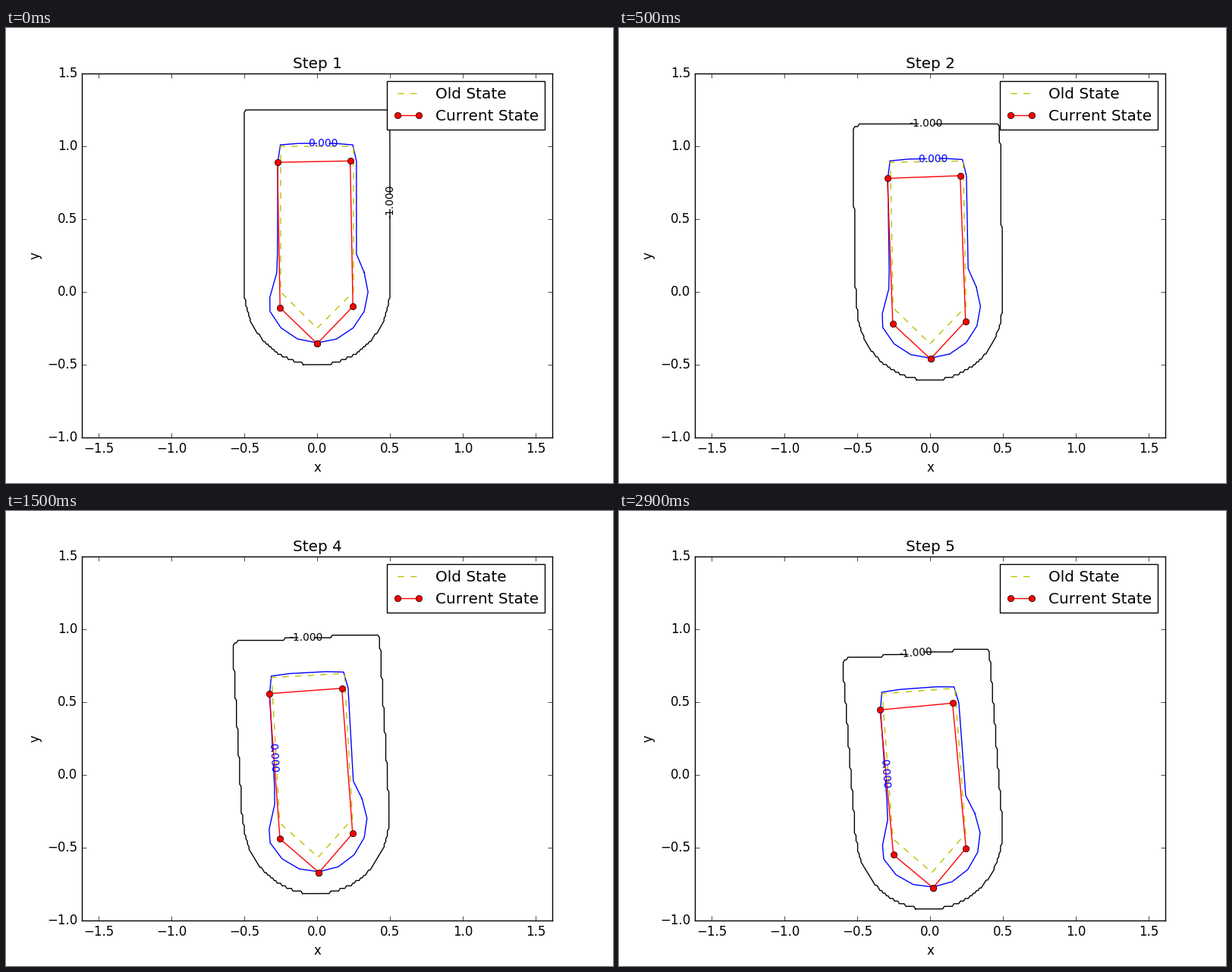
Animation, 800 px wide and 600 px high, one loop 3500 ms. Source, as a matplotlib script:

```python
import numpy as np
import matplotlib.pyplot as plt
from matplotlib.animation import FuncAnimation

plt.style.use("classic")
plt.rcParams["font.family"] = "DejaVu Sans"
plt.rcParams["text.kerning_factor"] = 6

SCALE = 192          # pixels per data unit
STEPS = 5
HOLD = 2             # extra ticks on the last step

# All shapes are in body coordinates: x to starboard, y towards the stern.
HULL = np.array([(0, -.25), (.25, 0), (.25, 1), (-.25, 1), (-.25, 0), (0, -.25)])

# Zero-level outline: a coarse arc round the bow, then up and over the stern.
arc = np.radians(np.arange(22.5, -158, -22.5))
bow = .35 * np.column_stack([np.cos(arc), np.sin(arc)])
stern = [(-.325, -.04), (-.277, .13), (-.272, .25), (-.27, .89), (-.252, 1.01),
         (-.13, 1.02), (.12, 1.02), (.245, 1.01), (.27, .9), (.27, .26)]
OUTLINE = np.vstack([bow, stern, bow[:1]])


def pose(n):
    """Position and heading of the body after n steps."""
    return np.array([-.0049 * n + .00088 * n * n, -.1052 * n]), .0185 * n


def place(points, n):
    origin, angle = pose(n)
    c, s = np.cos(angle), np.sin(angle)
    return np.asarray(points) @ np.array([(c, s), (-s, c)]) + origin


def safety_line(n):
    """Staircase edge of the safety zone, sampled on a grid over its bounds."""
    origin, angle = pose(n)
    left, right = place([(-.5, 1.25), (.5, 1.25)], n)
    xs = np.linspace(min(left[0], origin[0] - .5), origin[0] + .5, 100)
    ys = np.linspace(origin[1] - .5, right[1], 100)
    x, y = np.meshgrid(xs, ys)
    dx, dy = x - origin[0], y - origin[1]
    c, s = np.cos(angle), np.sin(angle)
    u, v = c * dx + s * dy, c * dy - s * dx
    box = (abs(u) < .5) & (v >= 0) & (v < 1.25)
    inside = box | ((v < 0) & (np.hypot(u, v) < .492))
    inside[[0, -1], :] = False
    inside[:, [0, -1]] = False
    contour = ax.contour(x, y, inside - 1.0, levels=[-.99])
    line = max(contour.allsegs[0], key=len)
    contour.remove()
    return line


def draw_level(line, label, curve, anchor, width, gap):
    """Lay the label on the chord of the curve near anchor and cut a gap there."""
    lengths = np.hypot(*np.diff(curve, axis=0).T)
    along = np.r_[0, np.cumsum(lengths)]
    at = np.union1d(np.linspace(0, along[-1], 2500), along)
    dense = np.column_stack([np.interp(at, along, axis) for axis in curve.T])
    near = dense[np.hypot(*(dense - anchor).T) < width / 2 / SCALE]
    start, end = near[0], near[-1]
    centre = (start + end) / 2
    angle = np.degrees(np.arctan2(*(end - start)[::-1]))
    label.set_position(centre)
    label.set_rotation((angle + 89.9) % 180 - 89.9)
    dense[np.hypot(*(dense - centre).T) < gap / 2 / SCALE] = np.nan
    line.set_data(*dense.T)


def level_artists(color, text):
    line, = ax.plot([], [], color=color)
    return line, ax.text(0, 0, text, color=color, size=10, ha="center", va="center")


fig = plt.figure(figsize=(8, 6), dpi=100, facecolor="w")
ax = fig.add_subplot()
ax.set_xlim(-310 / SCALE, 310 / SCALE)
ax.set_ylim(-1, 1.5)
ax.set_xticks(np.arange(-1.5, 1.6, .5))
ax.set_yticks(np.arange(-1, 1.6, .5))
ax.set_xlabel("x", labelpad=5.7)
ax.set_ylabel("y")
title = ax.set_title("")

outer = level_artists("k", "-1.000")
zero = level_artists("b", "0.000")
old, = ax.plot([], [], "y--", label="Old State")
current, = ax.plot([], [], "ro-", label="Current State")
ax.legend(loc="upper right")


def update(tick):
    step = min(tick, STEPS - 1)
    title.set_text(f"Step {step + 1}")
    old.set_data(*place(HULL, step).T)
    current.set_data(*place(HULL, step + 1).T)
    # Labels move from one side of their line to another as the body turns.
    outer_anchor = place((.5, .62) if step < 1 else (0, 1.25), step)
    zero_anchor = place((.04, 1.02) if step < 2 else (-.27, .45), step)
    draw_level(*outer, safety_line(step), outer_anchor, 44, 21)
    draw_level(*zero, place(OUTLINE, step), zero_anchor, 39, 17)
    return []


anim = FuncAnimation(fig, update, frames=STEPS + HOLD, interval=500,
                     repeat=True, repeat_delay=0)
plt.show()
```
